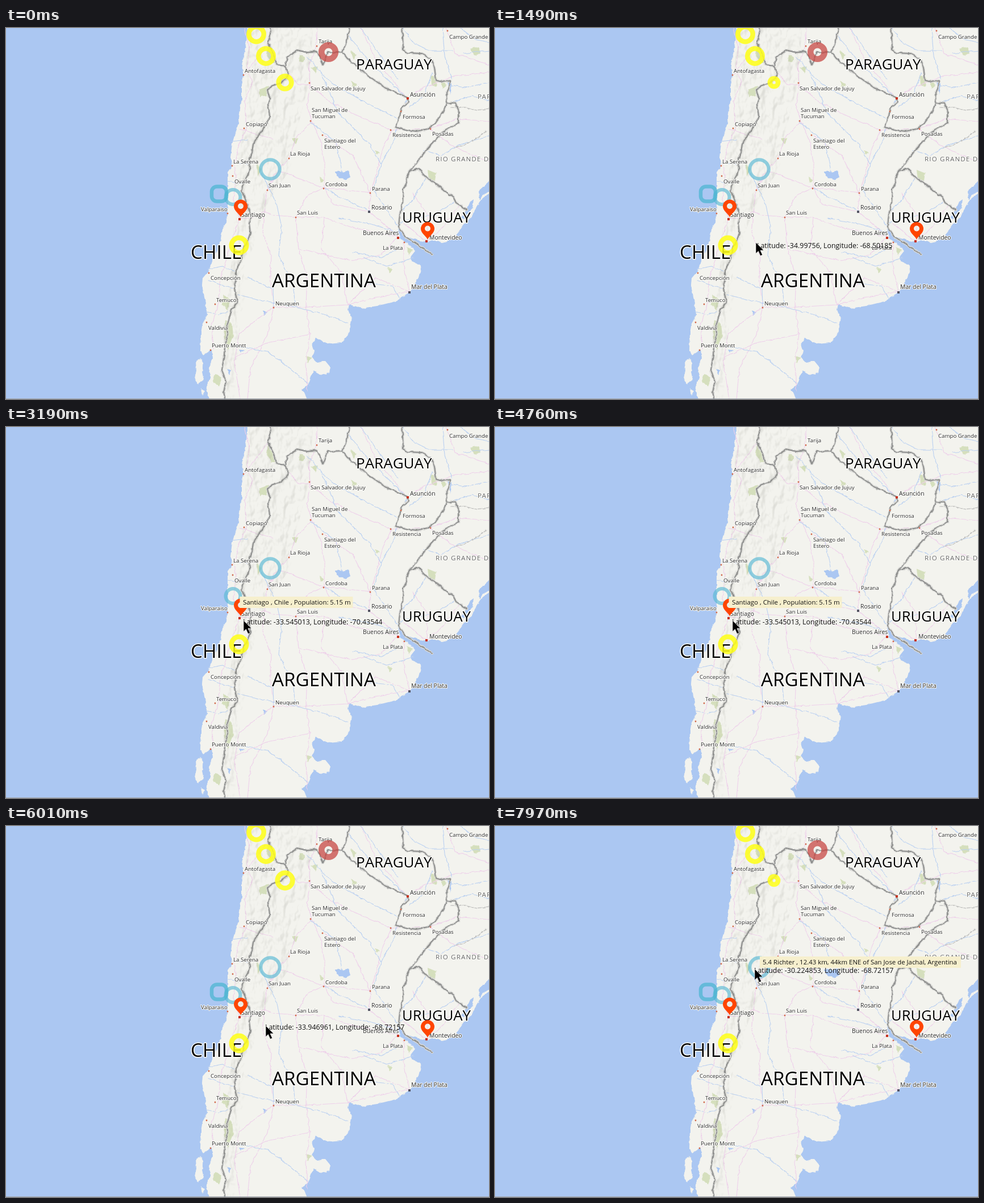
Animation of 850x654 px, one loop 8000 ms. Source, as an HTML page:

```html
<!DOCTYPE html>
<html lang="en">
<head>
<meta charset="utf-8">
<title>Seismic map</title>
<style>
html, body { margin: 0; width: 100%; height: 100%; overflow: hidden; background: #abc7f2; }
svg { display: block; width: 850px; height: 654px; font-family: "Open Sans", "Noto Sans", sans-serif; }
.land { fill: #f3f3ee; }
.line { fill: none; stroke-linejoin: round; stroke-linecap: round; }
.border { stroke: #8d8e8d; stroke-width: 1.9; }
.glow { stroke: #d9d9d6; stroke-width: 4.5; }
.road { stroke: #eed0ea; stroke-width: 1.1; }
.river { stroke: #bad0f1; stroke-width: 1.1; }
.green { fill: #d5dfbd; }
.water { fill: #abc7f2; }
.place { fill: #2b2b2b; stroke: #fbfbf8; stroke-width: 2px; stroke-linejoin: round; paint-order: stroke; }
.country { fill: #000; stroke-width: 3px; font-kerning: none; }
.region { fill: #666; font-size: 11.5px; letter-spacing: 1.2px; }
.ring { fill: none; }
.pin { fill: #ff4500; fill-rule: evenodd; }
.tip rect { fill: #f6efcd; }
.tip text { font-size: 11.4px; fill: #111; }
#coords { font-size: 12.4px; fill: #111; }
</style>
</head>
<body>
<svg viewBox="0 0 850 654">
<defs>
  <filter id="rough" filterUnits="userSpaceOnUse" x="-20" y="-20" width="890" height="694" color-interpolation-filters="sRGB">
    <feTurbulence type="fractalNoise" baseFrequency=".11" numOctaves="2" seed="4"/>
    <feDisplacementMap in="SourceGraphic" scale="5" xChannelSelector="R" yChannelSelector="G"/>
  </filter>
  <filter id="relief" filterUnits="userSpaceOnUse" x="320" y="0" width="240" height="654" color-interpolation-filters="sRGB">
    <feTurbulence type="fractalNoise" baseFrequency=".055 .035" numOctaves="3" seed="9"/>
    <feDiffuseLighting surfaceScale="9" diffuseConstant="1" lighting-color="#fff">
      <feDistantLight azimuth="225" elevation="60"/>
    </feDiffuseLighting>
    <feColorMatrix values="0 0 0 0 .5  0 0 0 0 .5  0 0 0 0 .46  -1.2 0 0 0 1.04"/>
  </filter>
  <clipPath id="andes"><path d="M428 0H540L535 90 512 180 500 250 465 300 440 360 428 430 412 520 402 654H385L383 540 395 430 402 330 405 230 420 160 422 60Z"/></clipPath>
  <path id="pin" class="pin" d="M0 0C-2-6-12-11-12-19A12 12 0 0 1 12-19C12-11 2-6 0 0ZM0-24.5A5 5 0 0 0 0-14.5A5 5 0 0 0 0-24.5Z"/>
</defs>

<rect width="850" height="654" fill="#abc7f2"/>
<g filter="url(#rough)">
  <path class="land" d="M424-15 425 8 421 36 415 66 418 83 415 100 415 125 412 142 409 168 402 190 398 204 395 228 398 243 390 254 390 275 390 292 391 314 389 327 388 343 381 355 378 372 373 390 363 409 357 428 346 441 345 454 350 478 354 506 346 520 343 538 342 568 347 577 362 567 364 582 356 600 360 617 352 632 362 670H536L526 645 520 637 531 629 536 614 541 604 555 612 569 608 571 598 562 587 548 590 538 580 543 570 538 556 545 546 567 557 590 555 603 540 608 509 601 497 603 487 626 494 653 490 685 482 711 465 726 440 730 425 728 417 714 411 713 402 720 393 716 388 702 377 692 369 690 350 703 366 725 374 741 377 752 374 768 379 778 376 788 370 798 358 805 347 821 332 828 315 835 304 848 294 870 280V-15Z"/>
  <path class="land" d="M343 582 348 592 345 606 348 620 338 628 331 622 335 604 334 588Z"/>
  <path class="land" d="M343 636 350 640 345 648Z"/>
  <g class="green">
    <path d="M383 470 395 480 390 497 380 487ZM386 515 398 520 400 545 390 568 384 545ZM368 610 379 616 374 632 364 622Z"/>
    <path d="M461 33 475 58 468 64 459 47ZM446 108 462 103 458 119 447 121Z"/>
    <path d="M517 48 526 52 523 62 516 58ZM536 70 550 68 545 80ZM607 94 618 100 612 105ZM605 40 617 47 612 55ZM747 85 760 87 757 103 748 100ZM765 92 775 100 768 106ZM816 37 831 33 835 44 824 48Z"/>
    <path d="M502 194 514 196 510 205ZM442 240 449 250 443 261ZM552 262 559 267 554 273ZM650 215 657 219 652 224ZM742 250 757 256 755 270 744 267ZM672 422 680 426 674 432ZM528 578 538 581 532 590ZM705 385 716 390 709 400Z"/>
  </g>
  <g class="water">
    <path d="M578 254 586 250 593 255 602 251 606 264 598 268 592 266 584 262Z"/>
    <path d="M776 95 785 98 782 118ZM452 498 461 501 455 506ZM411 567 419 568 414 572ZM390 601 396 604 392 610Z"/>
    <path d="M834 303 832 291 838 281 848 272 860 258V282L850 288 838 296ZM823 303 816 308 809 321 800 335 806 336 814 326 821 317Z"/>
  </g>
  <g class="line road">
    <path d="M420 0 428 35 424 75 435 95 420 130 423 178 410 205 402 240 405 270 400 300 411 336 399 370 390 400 378 440 374 485 362 525 365 565"/>
    <path d="M548 0 545 35 533 66 535 100 530 135 538 164 553 195 560 235 560 282 575 310 640 324 690 368"/>
    <path d="M538 164 510 195 498 230 473 258 459 286 455 323 470 330 510 333 560 334 610 352 690 368"/>
    <path d="M411 336 430 335 455 323 451 360 466 400 465 440 471 492 530 492 601 488 650 475 710 465"/>
    <path d="M560 282 530 295 510 333 515 390 530 440 528 490 535 540 528 590 530 640"/>
    <path d="M535 100 570 130 620 155 679 180 745 178 790 210 850 236M679 180 660 220 651 260 641 290 639 324"/>
    <path d="M560 189 610 225 641 290M560 282 641 290M560 334 555 390 590 430 601 488M690 368 660 400 610 410 515 390"/>
    <path d="M700 378 700 420 710 465 650 440 601 488M740 376 770 350 800 310M740 376 742 330 715 290M740 376 700 345"/>
    <path d="M706 124 735 105 790 85 850 78M745 178 795 160 850 165M775 0 790 45 850 65M706 124 650 55 625 0"/>
    <path d="M471 492 440 515 410 540 402 590 412 654M471 492 460 540 430 600 425 654M404 580 460 555 535 540"/>
    <path d="M465 22 438 58 420 82M412 178 450 190 470 195M490 70 515 100 535 100M459 286 480 252 560 282"/>
  </g>
  <g class="line river">
    <path d="M706 124 690 160 682 200 660 240 646 285 670 320 690 350"/>
    <path d="M530 50 570 95 630 130 690 160M555 80 585 150 640 205 660 240M535 165 580 200 592 255"/>
    <path d="M600 10 640 60 706 124M625 0 660 50 690 90M700 0 715 25 745 40 785 40M780 100 808 105 850 96"/>
    <path d="M768 0 772 50 785 90M800 0 825 20 850 25M805 45 850 40M750 80 735 120 710 140M785 130 820 120 850 128"/>
    <path d="M560 282 590 300 640 322M585 335 640 345 690 360M450 255 476 310 485 350 480 400 505 455 510 492"/>
    <path d="M407 470 450 480 510 492 560 505 602 520M400 560 460 570 500 600 535 630M425 440 470 460 471 492"/>
    <path d="M740 262 715 305 692 325M790 305 755 330 715 335 692 345M735 215 765 225 800 205 850 190M690 390 660 405 610 395M718 405 670 420 630 405M695 480 680 455 640 450"/>
    <path d="M356 425 380 420 405 430M357 445 385 455 403 460M350 500 375 505 390 500M395 200 425 197M398 238 425 240M390 270 415 275"/>
  </g>
  <path class="line" stroke="#b9b9b8" stroke-width="1.2" stroke-dasharray="5 2" d="M783 140 810 141 828 145 850 142M845 182 820 200 790 212"/>
  <g id="borders" class="line">
    <path d="M464-10 466 10 461 27 470 45 476 65 491 67 497 78 494 88 483 97 467 102 460 110 465 125 461 135 464 155 459 169 447 185 435 204 433 220 428 231 429 252 420 268 414 286 420 298 423 308 431 330 428 345 430 362 424 378 418 390 412 413 404 428 404 445 402 460 408 485 397 496 394 508 389 525 390 538 386 555 384 575 382 590 380 603 388 625 383 640 387 664"/>
    <path d="M491 67 495 53 512 39 530 43 548 42 552 50 557 65 566 43 592 42 600 53 625 75 647 91 672 108 706 122 708 130 697 140 693 155 685 175 700 179 722 182 742 178 757 166 770 147 776 134 775 118 780 105 781 93 768 95 757 92 754 70 748 55 733 45 707 44 699 38 697-10"/>
    <path d="M592 42 600 22 607-10"/>
    <path d="M776 134 790 131 797 148 797 168 774 180 757 196 739 216 722 239 709 254 705 270 699 284 698 308 693 329 691 350 703 368 725 382 749 398"/>
    <path d="M709 254 725 248 738 262 755 273 772 287 787 298 792 308 811 320"/>
  </g>
</g>
<g clip-path="url(#andes)"><rect x="320" width="240" height="654" filter="url(#relief)" opacity=".2"/></g>
<g id="places"></g>
<path d="M0 653.5H850" stroke="#a2a8b0"/>

<g id="kept">
  <circle class="ring" cx="465" cy="249" r="16.7" stroke="#5ab9d5" stroke-opacity=".66" stroke-width="6"/>
  <circle class="ring" cx="399.5" cy="298" r="13" stroke="#5ab9d5" stroke-opacity=".66" stroke-width="6"/>
  <circle class="ring" cx="410" cy="383" r="13.2" stroke="#ffff18" stroke-opacity=".86" stroke-width="8.5"/>
  <use href="#pin" x="413" y="333.5"/>
</g>
<g id="filtered">
  <g class="ring" stroke="#ffff18" stroke-opacity=".86" stroke-width="8.5">
    <circle cx="440.5" cy="11" r="13.2"/>
    <circle cx="457.5" cy="49.5" r="13.2"/>
    <circle id="pulse" cx="491" cy="96"/>
  </g>
  <circle class="ring" cx="567.5" cy="42.5" r="12.3" stroke="#c7433f" stroke-opacity=".72" stroke-width="10.6"/>
  <rect class="ring" x="362" y="279.5" width="26" height="26" rx="9" stroke="#48b5d0" stroke-opacity=".7" stroke-width="6.5"/>
  <use href="#pin" x="742" y="373"/>
</g>

<g class="tip" id="cityTip"><rect x="411.5" y="299" width="199" height="20"/><text x="417" y="313">Santiago , Chile , Population: 5.15 m</text></g>
<g class="tip" id="quakeTip"><rect x="466" y="230" width="354" height="20"/><text x="471" y="244">5.4 Richter , 12.43 km, 44km ENE of San Jose de Jachal, Argentina</text></g>
<g id="pointer">
  <text id="coords"></text>
  <path id="arrow" d="M1 0V19.5L5.4 15.4 9 23.5 12.6 22 9 14H15Z" stroke="#fff" stroke-width=".6"/>
</g>
</svg>

<script>
const $ = id => document.getElementById(id);
const LOOP = 8000;

function add(parent, tag, attrs, text) {
  const el = document.createElementNS("http://www.w3.org/2000/svg", tag);
  for (const key in attrs) el.setAttribute(key, attrs[key]);
  if (text) el.textContent = text;
  return parent.appendChild(el);
}

function label(text, x, y, size, kind = "") {
  add($("places"), "text", { x, y, class: "place " + kind, ...(size && { "font-size": size }) }, text);
}

function town(text, x, y, dotX, dotY) {
  if (dotX) add($("places"), "circle", { cx: dotX, cy: dotY, r: 1.4, fill: "#d06a4c" });
  label(text, x, y, 9.7);
}

function city(text, x, y, dotX, dotY, color = "#c5321c") {
  add($("places"), "rect", { x: dotX - 2, y: dotY - 2, width: 4, height: 4, fill: color });
  label(text, x, y, 10.4);
}

// Wide pale casing below each border line
for (const path of [...$("borders").children]) {
  add($("borders"), "path", { d: path.getAttribute("d"), class: "border" });
  path.setAttribute("class", "glow");
}

town("Tarija", 550, 27, 547, 32);
town("Antofagasta", 420, 79, 418, 83);
town("San Salvador de Jujuy", 536, 110, 534, 97);
town("San Miguel de", 538, 148, 536, 164);
town("Tucuman", 538, 159);
town("Copiapó", 422, 173, 419, 177);
town("Santiago del", 560, 202, 557, 189);
town("Estero", 560, 213);
town("La Rioja", 500, 225, 498, 230);
town("La Serena", 400, 239, 398, 243);
town("Ovalle", 402, 274, 399, 261);
town("San Juan", 462, 281, 460, 286);
town("Valparaiso", 343, 323, 390, 327);
town("San Luis", 512, 329, 510, 334);
town("Parana", 644, 287, 641, 291);
town("Formosa", 698, 160, 695, 147);
town("Resistencia", 680, 192, 677, 180);
town("Posadas", 750, 190, 747, 178);
town("La Plata", 663, 391, 701, 378);
town("Concepción", 360, 444, 357, 432);
town("Temuco", 370, 483, 368, 487);
town("Valdivia", 356, 532, 353, 519);
town("Puerto Montt", 362, 563, 360, 568);
town("Neuquen", 474, 489, 471, 493);
town("Campo Grande", 780, 19, 777, 5);
town("Cordoba", 562, 279, 559, 283);
city("Asunción", 711, 121, 707, 124);
city("Santiago", 414, 333, 411, 337);
city("Rosario", 643, 320, 639, 324, "#555563");
city("Buenos Aires", 628, 365, 690, 370);
city("Montevideo", 745, 373, 740, 376);
city("Mar del Plata", 713, 460, 710, 466, "#555563");
label("PARAGUAY", 616, 73, 26, "country");
label("URUGUAY", 697, 343, 25.6, "country");
label("CHILE", 325, 407, 33.2, "country");
label("ARGENTINA", 468, 457, 33.2, "country");
label("RIO GRANDE DO SUL", 756, 235, 0, "region");
label("PARANÁ", 830, 125, 0, "region");

// Mouse track: time, x, y
const track = [
  [30, 662, 648], [840, 520, 433], [1450, 461, 381], [1670, 447, 363], [2360, 419, 344],
  [2400, 415, 342], [2480, 417, 341], [4760, 417, 341], [5350, 456, 352], [6450, 456, 352],
  [7070, 456, 282], [7110, 456, 278], [7290, 456, 270], [7900, 456, 252], [8000, 456, 252]
];
const clamp = v => Math.max(0, Math.min(1, v));

function mouseAt(t) {
  const i = Math.max(1, track.findIndex(p => p[0] >= t));
  const [a, b] = [track[i - 1], track[i]];
  const k = clamp((t - a[0]) / (b[0] - a[0]));
  return [1, 2].map(n => Math.round(a[n] + (b[n] - a[n]) * k));
}

// Web Mercator at zoom 5, anchored at one known point
const DEG = Math.PI / 180, WORLD = 8192;
const anchor = { x: 461, y: 381, lat: -34.99756, lon: -68.501846 };

function coordsText(x, y) {
  const north = Math.asinh(Math.tan(anchor.lat * DEG)) - (y - anchor.y) * 2 * Math.PI / WORLD;
  const lat = Math.atan(Math.sinh(north)) / DEG;
  const lon = anchor.lon + (x - anchor.x) * 360 / WORLD;
  return `Latitude: ${+lat.toPrecision(8)}, Longitude: ${+lon.toPrecision(7)}`;
}

const show = (id, visible) => { $(id).style.display = visible ? "" : "none"; };

function draw(t) {
  // The ring grows from its centre, then restarts; its stroke stays constant
  const phase = t < 4000 ? t / 555 + .84 : (t - 6010) / 555 + 10.99;
  $("pulse").setAttribute("r", 13.5 * (phase % 1));
  $("filtered").style.opacity = t < 4000 ? 1 - clamp((t - 2530) / 660) : clamp((t - 5650) / 360);

  show("cityTip", t >= 2280 && t < 4880);
  show("quakeTip", t >= 7640);
  show("pointer", t >= 30);

  const [x, y] = mouseAt(t);
  $("arrow").setAttribute("transform", `translate(${x} ${y})`);
  // The readout trails the pointer slightly
  const [labelX, labelY] = mouseAt(t - 40);
  $("coords").setAttribute("x", labelX);
  $("coords").setAttribute("y", labelY + 7);
  $("coords").textContent = coordsText(labelX, labelY);
}

const start = performance.now();
function tick() {
  draw((performance.now() - start) % LOOP);
  requestAnimationFrame(tick);
}
tick();
</script>
</body>
</html>
```
